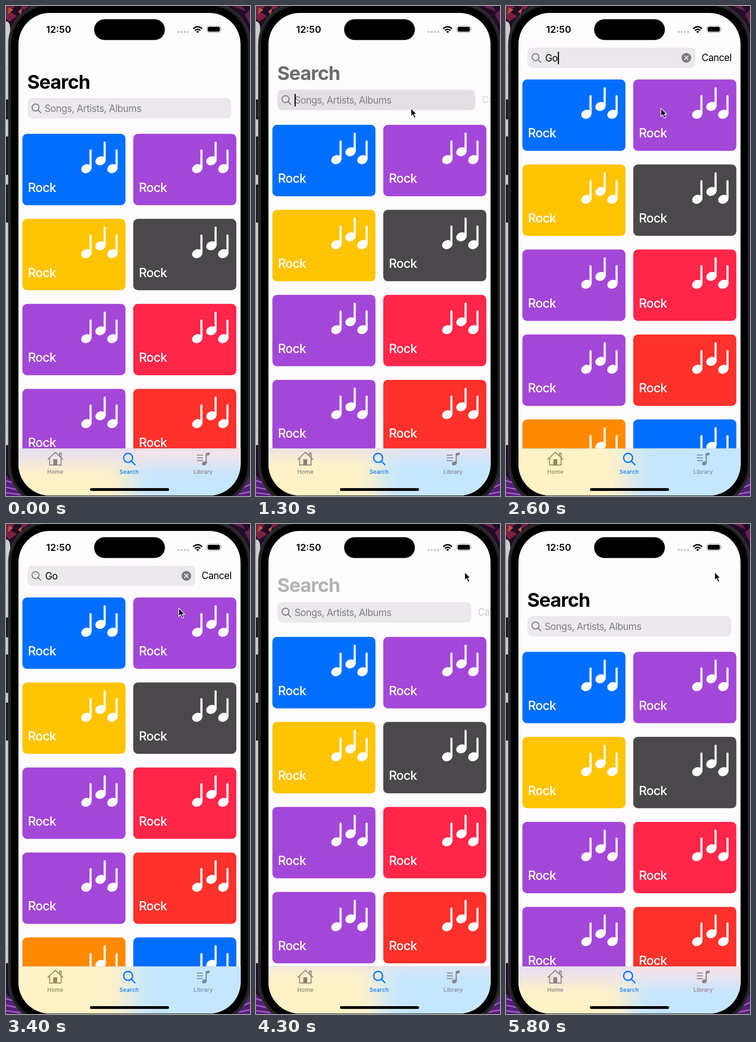
Recreate the animation shown at these times as an HTML page. Size 529 by 1059 pixels, loop 5900 ms.

```html
<!DOCTYPE html>
<html lang="en">
<head>
<meta charset="utf-8">
<title>Music search</title>
<style>
html, body { margin: 0; width: 100%; height: 100%; overflow: hidden; background: #1a0c22; }
svg { display: block; width: 529px; height: 1059px; font-family: Inter, Roboto, sans-serif; }
.body { font-size: 20.8px; letter-spacing: -.55px; }
.rock { font-size: 27px; font-weight: 500; letter-spacing: -.8px; fill: #fff; }
.tab { font-size: 12.2px; font-weight: 500; letter-spacing: .15px; text-anchor: middle; }
.line { fill: none; stroke: currentColor; stroke-width: 2; stroke-linejoin: round; stroke-linecap: round; }
.fill { fill: currentColor; }
</style>
</head>
<body>
<svg viewBox="0 0 529 1059">
  <defs>
    <clipPath id="screen"><rect x="27" y="15" width="481.5" height="1043" rx="68"/></clipPath>
    <clipPath id="bar"><rect x="27" y="956" width="482" height="103"/></clipPath>
    <filter id="blur" filterUnits="userSpaceOnUse" x="-150" y="650" width="850" height="800" color-interpolation-filters="sRGB">
      <feGaussianBlur stdDeviation="28 18"/>
    </filter>
    <g id="note">
      <ellipse cx="138.7" cy="75.2" rx="11.4" ry="9.4" transform="rotate(-22 138.7 75.2)"/>
      <path d="M147.8 36V74" stroke="#fff" stroke-width="4.6" stroke-linecap="round"/>
    </g>
    <g id="notes" fill="#fff">
      <use href="#note"/><use href="#note" x="30.7" y="-17"/><use href="#note" x="56.5"/>
    </g>
  </defs>

  <!-- desktop behind the phone -->
  <rect width="529" height="1059" fill="#220d27"/>
  <path d="M0 0H20L8 12L24 22L6 34L0 26zM32 0H50L38 9z" fill="#7a2140"/>
  <path d="M6 3L16 8L4 18zM26 12L36 4L32 18z" fill="#b5573f"/>
  <path d="M492 0H512L520 12zM518 18L529 8V40z" fill="#64204f"/>
  <path d="M0 33Q8 34 9 46V949H0z" fill="#cfcdd0"/>
  <path d="M0 135H5M0 916H5" stroke="#aaa8ab"/>
  <path d="M0 1014L40 1059H0zM529 1016V1059H492z" fill="#54207a"/>
  <path d="M0 1026L14 1030M0 1040L24 1045M0 1052L32 1056M529 1034L512 1042M529 1050L504 1055" stroke="#a35bc4" stroke-width="3"/>

  <!-- phone -->
  <path d="M0 202H6V245H0zM0 282H6V365H0zM0 386H6V468H0z" fill="#1d1b1d"/>
  <rect x="4.5" y="-8" width="526" height="1090" rx="90" fill="#39373a"/>
  <rect x="6.5" y="-6" width="522" height="1086" rx="88" fill="#222123"/>
  <rect x="11" y="-1" width="513" height="1075" rx="84"/>
  <g clip-path="url(#screen)">
    <rect x="27" y="15" width="482" height="1044" fill="#fefcfe"/>
    <text id="title" x="46" y="179" font-size="41.5" font-weight="700" letter-spacing="-1.1">Search</text>
    <g id="cards"></g>

    <g id="field">
      <rect id="box" x="46.5" y="199" height="44" rx="10.5"/>
      <g class="line" color="#747276"><circle cx="64" cy="219.3" r="7.6"/><path d="M69.6 225L75.5 230.8"/></g>
      <text id="hint" class="body" x="83.5" y="229" fill="#807e82">Songs, Artists, Albums</text>
      <text id="typed" class="body" x="85" y="229"></text>
      <rect id="caret" y="208" width="2.4" height="27"/>
      <g id="clear">
        <circle cy="221" r="10.5" fill="#7c7a7e"/>
        <path d="M-3.8 217.2L3.8 224.8M3.8 217.2L-3.8 224.8" stroke="#fff" stroke-width="1.9" stroke-linecap="round"/>
      </g>
      <text id="cancel" class="body" y="228">Cancel</text>
    </g>

    <!-- tab bar -->
    <g clip-path="url(#bar)">
      <rect x="27" y="956" width="482" height="103" fill="#f5f2f6"/>
      <g id="tint" filter="url(#blur)">
        <path d="M-60 790H268V988H-60z" fill="#e6dff0"/>
        <path d="M268 790H600V988H268z" fill="#f8e2e7"/>
        <path d="M-60 988H268V1330H-60z" fill="#fff2c7"/>
        <path d="M268 988H600V1330H268z" fill="#c5e6ff"/>
      </g>
      <path d="M27 956.2H509" stroke="#cfcbd1"/>
    </g>
    <g id="home">
      <path class="line" d="M91 979.5L107 964.5L123 979.5M94.5 977V992H119.5V977M116 972V966H119.5V975.5"/>
      <path class="fill" d="M102.5 979.5H111V992H102.5z"/>
      <text class="tab fill" x="107" y="1011">Home</text>
    </g>
    <g color="#0a7aff">
      <g class="line" style="stroke-width:2.8"><circle cx="264.7" cy="976.7" r="9.7"/><path d="M272 984L279.6 991.5"/></g>
      <text class="tab fill" x="267" y="1011">Search</text>
    </g>
    <g id="library">
      <path class="line" d="M414.5 970.5H426M414.5 976.5H426M414.5 982.5H426"/>
      <ellipse class="fill" cx="430" cy="988.5" rx="5.3" ry="4.3" transform="rotate(-20 430 988.5)"/>
      <path class="fill" d="M432.8 988V968Q432.8 966.5 434.3 966.2L441.5 964.7V970.3L435.3 971.8V988z"/>
      <text class="tab fill" x="427.5" y="1011">Library</text>
    </g>
    <rect x="182" y="1042" width="171.5" height="6" rx="3"/>

    <!-- status bar -->
    <text x="87" y="57.7" font-size="20.6" font-weight="600">12:50</text>
    <rect x="191" y="28.5" width="153.5" height="45" rx="22.5"/>
    <path d="M374.3 56H395" stroke="#c4c2c5" stroke-width="4.4" stroke-linecap="round" stroke-dasharray="0 6.8"/>
    <g fill="none" stroke="#000" stroke-width="3">
      <path d="M406 49.2Q415.5 40.4 425 49.2M409.6 53Q415.5 47.6 421.4 53"/>
    </g>
    <path d="M412.4 55.4Q415.5 52.6 418.6 55.4L415.5 58.6z"/>
    <rect x="435.5" y="43" width="30" height="14.5" rx="4.6" fill="none" stroke="#a3a1a4" stroke-width="1.2"/>
    <rect x="437.4" y="44.9" width="26.2" height="10.7" rx="3"/>
    <path d="M467 48Q469.3 50.2 467 52.6z" fill="#a3a1a4"/>
  </g>
  <path id="pointer" d="M0 0V17.5L4 13.8L7.3 21.3L10.4 20L7.2 12.7H12.4z" stroke="#fff" stroke-width="1.3"/>
</svg>
<script>
const LOOP = 5900, FOCUS = 1223, TAP = 4000, CLOSE = 4103, SLIDE = 302;
const $ = id => document.getElementById(id);
const ease = (t, from, dur) => {
  const u = Math.min(1, Math.max(0, (t - from) / dur));
  return u * u * (3 - 2 * u);
};
const mix = (a, b, u) => a + (b - a) * u;
const blend = (a, b, u) => `rgb(${a.map((v, i) => mix(v, b[i], u))})`;
const shift = (id, x, y) => $(id).setAttribute('transform', `translate(${x} ${y})`);

const colors = ['#006fff', '#a347d8', '#fec400', '#4a484b', '#a347d8',
  '#ff2649', '#a347d8', '#ff312b', '#ff8a00', '#006fff'];
$('cards').innerHTML = colors.map((color, i) =>
  `<g transform="translate(${35.5 + i % 2 * 240.4} ${276.3 + (i >> 1) * 183.7})">
    <rect width="223.5" height="154.3" rx="10" fill="${color}"/>
    <use href="#notes"/><text class="rock" x="12" y="125.5">Rock</text></g>`).join('');

// Time, x, y of the pointer's stops
const stops = [[150, 532, 420], [950, 336, 221], [3150, 336, 221], [3800, 452.5, 104]];
function pointerAt(t) {
  let [, x, y] = stops[0];
  for (let i = 1; i < stops.length; i++) {
    const [from] = stops[i - 1], [to, nx, ny] = stops[i], u = ease(t, from, to - from);
    x = mix(x, nx, u);
    y = mix(y, ny, u);
  }
  return [x, y];
}

function draw(t) {
  const open = ease(t, FOCUS, SLIDE) - ease(t, CLOSE, SLIDE);
  const scroll = -117.5 * open, right = 488.5 - 78.5 * open;
  const focused = t >= FOCUS && t < TAP;
  const text = focused ? 'Go'.slice(0, (t >= 2300) + (t >= 2500)) : '';

  shift('cards', 0, scroll);
  shift('tint', 0, scroll);
  shift('title', 0, scroll);
  $('title').style.opacity = Math.max(0, 1 - 2.6 * open);

  shift('field', 0, -109 * open);
  const press = ease(t, 1150, 100) - ease(t, 1320, 150);
  $('box').setAttribute('width', right - 46.5);
  $('box').style.fill = blend([235, 233, 236], [227, 224, 228], press);
  $('typed').textContent = text;
  $('hint').style.display = text ? 'none' : '';
  $('caret').setAttribute('x', text ? 85.5 + $('typed').getComputedTextLength() : 83.6);
  $('caret').style.display = focused && (t - 1300) % 1100 < 700 ? '' : 'none';
  shift('clear', right - 19, 0);
  $('clear').style.display = text ? '' : 'none';
  $('cancel').setAttribute('x', right + 14);
  $('cancel').style.opacity = t < TAP ? open : .25 * Math.min(1, open * 3);

  $('home').style.color = blend([139, 128, 132], [148, 135, 92], open);
  $('library').style.color = blend([142, 128, 132], [112, 142, 166], open);
  shift('pointer', ...pointerAt(t));
}

function tick() {
  draw(performance.now() % LOOP);
  requestAnimationFrame(tick);
}
tick();
</script>
</body>
</html>
```
